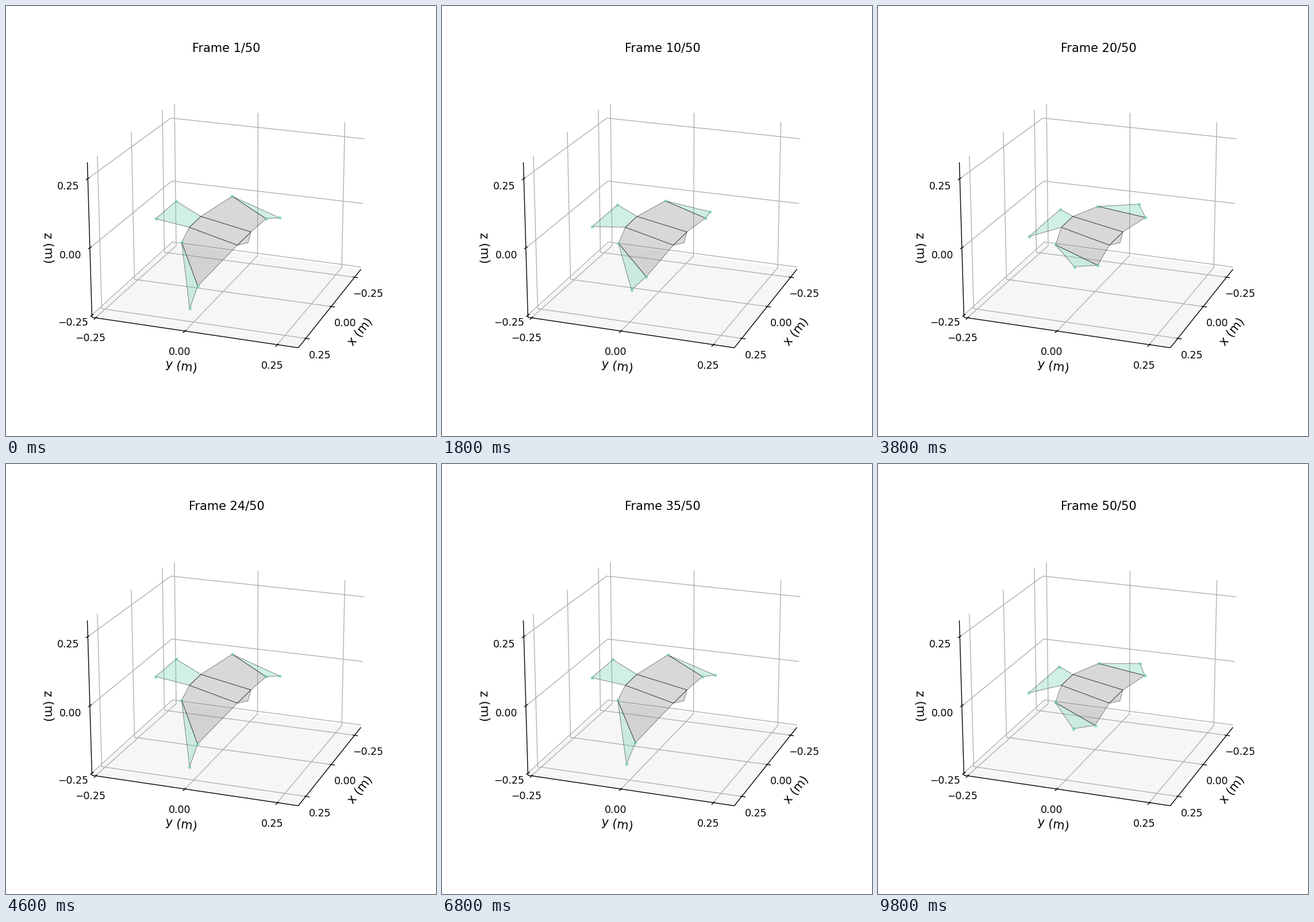
Write a matplotlib script that moves like this. It is 748 by 748 pixels and loops after 10000 ms.

```python
import numpy as np
import matplotlib.pyplot as plt
from matplotlib.animation import FuncAnimation
from matplotlib.patches import Polygon

SIZE, DPI, FRAMES = 748, 125, 50
GRID, MINT = "#b0b0b0", "mediumaquamarine"

plt.rcParams["font.family"] = "DejaVu Sans"
fig = plt.figure(figsize=(SIZE / DPI, SIZE / DPI), dpi=DPI, facecolor="white")
ax = fig.add_axes([0, 0, 1, 1])
ax.set_xlim(0, SIZE)
ax.set_ylim(SIZE, 0)
ax.axis("off")


def line(*pts, color=GRID, z=2):
    ax.plot(*zip(*pts), color=color, lw=0.8, zorder=z,
            solid_capstyle="butt", solid_joinstyle="round")


def tick(x, y, dx, dy):
    line((x - dx, y - dy), (x + dx, y + dy), color="black", z=3)


def tick_text(x, y, text):
    ax.text(x, y + 6.3, text, size=10, ha="center", va="baseline")


def axis_text(x, y, text, angle):
    ax.text(x, y, text, size=12, ha="center", va="center", rotation=angle)


# floor and grid
ax.add_patch(Polygon([(149.5, 541.5), (508.5, 594.5), (617.5, 458), (289.5, 414)],
                     fc="#f6f6f6", ec="none", zorder=1))
line((159, 261), (166.5, 526.5), (523, 578.5))
line((218, 219), (223.5, 475.5), (567.5, 523))
line((272, 180.5), (275.5, 428.5), (607.5, 472))
line((293, 170.5), (296, 417), (155, 543))
line((438.5, 186), (437.5, 434.5), (310.5, 566.5))
line((589.5, 202), (584, 455), (471, 590))
line((141.5, 301), (287, 195), (623.5, 231))
line((146, 421), (288.5, 304.5), (621, 343.5))
line((149.5, 537.5), (289.5, 410.5), (617.5, 454))

# axes, ticks and labels
line((141.5, 272), (149.5, 541.5), (508.5, 594.5), (617.5, 458), color="black", z=3)

for x, y, tx, ty, text in [(607.5, 472, 630, 500, "−0.25"),
                           (567.5, 523, 590, 551, "0.00"),
                           (523.5, 578.5, 546.5, 607, "0.25")]:
    tick(x, y, 4.5, 0.7)
    tick_text(tx, ty, text)
for x, y, tx, ty, text in [(155.5, 543, 146.5, 577, "−0.25"),
                           (310.5, 566, 302, 601, "0.00"),
                           (471.5, 590, 463, 625, "0.25")]:
    tick(x, y, 2.7, -2.5)
    tick_text(tx, ty, text)
for x, y, tx, ty, text in [(149.5, 538, 116.5, 550, "−0.25"),
                           (146, 420.5, 112.5, 433, "0.00"),
                           (142, 300.5, 108.5, 313, "0.25")]:
    tick(x, y, 3, -2.2)
    tick_text(tx, ty, text)

axis_text(616.5, 567, "x (m)", 51)
axis_text(305, 627, "y (m)", -8.4)
axis_text(72.5, 421, "z (m)", -88.3)
title = ax.text(383.35, 79.3, "", size=12, ha="center", va="baseline")

# fixed corners of the centre plate
C1, C2, C3, C4 = (319, 385), (339, 366), (426, 393), (402.5, 416)

# moving corners at three fold values: front, back, left
FOLDS = [-0.609, 0, 0.783]
POSES = np.array([
    [(310.5, 418.5), (411, 429), (354, 410.5), (376, 358.5),
     (473, 367), (439, 329.5), (264.5, 420.5), (329.5, 363)],
    [(308.5, 415), (377.5, 454.5), (339.5, 460.5), (383.5, 347),
     (464, 368), (456, 347), (262.5, 398), (315, 352.5)],
    [(305.5, 411), (333.5, 487), (319.5, 526.5), (393.5, 331),
     (452.5, 370), (476, 368.5), (260.5, 370), (296, 339.5)],
])
COEF = np.polyfit(FOLDS, POSES.reshape(3, -1), 2)


def panel(color, pts=((0, 0),)):
    face = ax.add_patch(Polygon(pts, fc=color, ec="none", alpha=0.3, zorder=5))
    edge = ax.add_patch(Polygon(pts, fill=False, ec="black", lw=0.5, alpha=0.5,
                                joinstyle="round", zorder=6))
    return face, edge


panel("gray", [C4, C3, (421, 412)])
panel("gray", [C1, C2, C3, C4])
front, back = panel("gray"), panel("gray")
front_tip, back_tip, left = panel(MINT), panel(MINT), panel(MINT)
dots, = ax.plot([], [], "o", color=MINT, ms=3.3, mew=0, alpha=0.65, zorder=7)


def fold(i):
    """Swing of the panels: a sine that ends at rest."""
    if i >= 40:
        return 0.0
    phase = np.interp(i, [0, 4, 34, 40], [51.5, 217.5, 1213, 1620])
    return np.sin(np.radians(phase))


def place(shape, *pts):
    for part in shape:
        part.set_xy(pts)


def update(i):
    p = (np.array([fold(i) ** 2, fold(i), 1]) @ COEF).reshape(-1, 2)
    a1, a2, a3, b1, b2, b3, l1, l2 = p
    place(front, C1, C4, a2, a1)
    place(back, C2, C3, b2, b1)
    place(front_tip, a1, a2, a3)
    place(back_tip, b1, b2, b3)
    place(left, C1, C2, l2, l1)
    dots.set_data(p[:, 0], p[:, 1])
    title.set_text(f"Frame {i + 1}/{FRAMES}")
    return []


anim = FuncAnimation(fig, update, frames=FRAMES, interval=200,
                     repeat=True, repeat_delay=0, blit=False)
plt.show()
```
